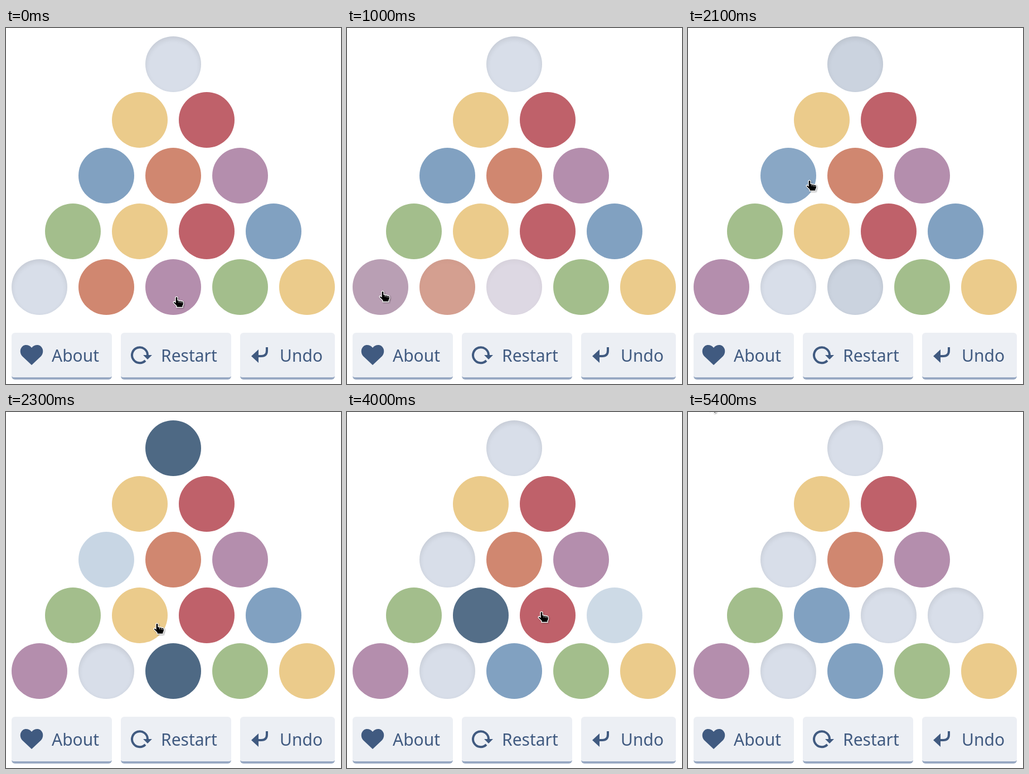
An HTML page for the animation above (5.5 s loop, 601x639 px).

```html
<!DOCTYPE html>
<html lang="en">
<head>
<meta charset="utf-8">
<title>Peg puzzle</title>
<style>
  html, body { margin: 0; width: 100%; height: 100%; overflow: hidden; background: #fff; }
  #stage { position: relative; width: 601px; height: 639px; overflow: hidden; }
  .peg { position: absolute; width: 100px; height: 100px; border-radius: 50%; }
  .button {
    position: absolute; top: 547px; height: 80px;
    background: #eceff4; border-bottom: 4px solid #98a9c3; border-radius: 6px;
  }
  svg { position: absolute; left: 0; top: 0; overflow: visible; }
  text { font: 30px "Noto Sans", "Open Sans", sans-serif; }
  .cursor { stroke: #fff; stroke-width: 1.3; filter: drop-shadow(1px 1px 1px rgba(0, 0, 0, .4)); }
</style>
</head>
<body>
<div id="stage">
  <div class="button" style="left:10px;width:180px"></div>
  <div class="button" style="left:206px;width:198px"></div>
  <div class="button" style="left:420px;width:170px"></div>
  <svg width="601" height="639" fill="#405a80">
    <path d="M46 605L29 589C24 583 25 575 30 571C35 567.500 42 569 46 574C50 569 57 567.500 62 571C67 575 68 583 63 589Z"/>
    <g fill="none" stroke="#405a80" stroke-width="4">
      <path d="M254 588V587A14 14 0 1 0 250 597"/>
      <path d="M450 589H458Q468 589 468 579V573"/>
    </g>
    <path d="M246 587H262L254 595ZM440 589L453 577V601Z"/>
    <text x="82" y="599">About</text>
    <text x="278" y="599">Restart</text>
    <text x="491" y="599">Undo</text>
  </svg>
  <svg id="hand" class="cursor" width="22" height="23">
    <path d="M5 2.500Q7 .3 9 2.500V7.500L18 9.500Q19.500 10 19.500 12V15L18 18V20.500H7V18L1.500 12.500Q.5 10 3 10L5 11.500Z"/>
    <path d="M11.500 9V12M14.500 10V12.500M17 11V13" stroke-width=".8"/>
  </svg>
  <svg id="arrow" class="cursor" width="18" height="27">
    <path d="M1 1V21L5.500 17L9 25L12.500 23.500L9.300 15.700H15.500Z"/>
  </svg>
</div>
<script>
const LOOP = 5500, STEP = 100, FADE = 300;
const stage = document.getElementById('stage');
const hand = document.getElementById('hand');
const arrow = document.getElementById('arrow');

const COLORS = {
  empty: [216, 222, 233],
  red: [191, 97, 106],
  orange: [208, 135, 112],
  yellow: [235, 203, 139],
  green: [163, 190, 140],
  blue: [129, 161, 193],
  purple: [180, 142, 173]
};

const START = `empty
  yellow red
  blue orange purple
  green yellow red blue
  empty orange purple green yellow`.split(/\s+/);

const MOVES = [
  { from: 12, to: 10, pick: 265, drop: 880 },
  { from: 3, to: 12, pick: 2070, drop: 2890 },
  { from: 9, to: 7, pick: 3800, drop: 4390 }
];

// Pointer legs: begin, end, and the spot reached
const LEGS = [
  [0, 0, 306, 482], [400, 800, 64, 472], [1200, 1400, 73, 477], [1400, 1500, 131, 418],
  [1500, 1900, 218, 273], [2100, 2300, 271, 379], [2300, 2400, 296, 433], [2600, 2700, 303, 449],
  [3100, 3400, 470, 355], [3400, 3600, 499, 358], [3800, 4300, 244, 358],
  [4600, 4900, 173, 198], [4900, 5400, 39, -22]
];

const mix = (a, b, p) => a + (b - a) * p;
const clamp = x => Math.min(1, Math.max(0, x));
const darken = rgb => rgb.map(c => c * .85 - 36);

// The CSS "ease" curve, solved by bisection
function ease(x) {
  if (x >= 1) return 1;
  const bezier = (a, b, s) => 3 * a * s * (1 - s) ** 2 + 3 * b * s * s * (1 - s) + s ** 3;
  let lo = 0, hi = 1;
  for (let i = 0; i < 20; i++) {
    const mid = (lo + hi) / 2;
    if (bezier(.25, .25, mid) < x) lo = mid; else hi = mid;
  }
  return bezier(.1, 1, lo);
}

const pegs = START.map((name, i) => {
  const row = Math.floor((Math.sqrt(8 * i + 1) - 1) / 2);
  const x = 300 + (i - row * (row + 1) / 2 - row / 2) * 120;
  const y = 65 + row * 100;
  const el = document.createElement('div');
  el.className = 'peg';
  el.style.left = x - 50 + 'px';
  el.style.top = y - 50 + 'px';
  stage.insertBefore(el, hand);
  return { x, y, el, name, start: name, changes: [] };
});

// The neighbour of a that lies halfway to b, if there is one
const between = (a, b) => pegs.find(p =>
  p !== a && 2 * p.x === a.x + b.x && 2 * p.y === a.y + b.y &&
  Math.hypot(p.x - a.x, p.y - a.y) < 125);

// dip is a momentary loss of opacity
function change(peg, time, name, { rgb = COLORS[name], opacity = 1, dip = 0 } = {}) {
  peg.changes.push({ time, name, rgb, opacity, dip, shade: name === 'empty' ? .09 : 0 });
}

function play({ from, to, pick, drop }) {
  const source = pegs[from], goal = pegs[to], color = source.name;
  const hints = pegs.filter(p => p.name === 'empty' && (between(source, p)?.name ?? 'empty') !== 'empty');
  const taken = between(source, goal);
  change(source, pick, color, { opacity: .5, dip: .2 });
  hints.forEach(p => change(p, pick, 'hint', { rgb: darken(COLORS[color]) }));
  hints.filter(p => p !== goal).forEach(p => change(p, drop, 'empty'));
  change(goal, drop, color, { dip: .3 });
  change(source, drop, 'empty', { dip: .2 });
  change(taken, drop + 70, 'empty', { dip: .2 });
  goal.name = color;
  source.name = taken.name = 'empty';
}

pegs.forEach(peg => change(peg, -FADE, peg.start));
MOVES.forEach(play);

function drawPeg(peg, t) {
  let rgb = COLORS.empty, opacity = 1, shade = 0;
  for (const next of peg.changes.filter(c => c.time <= t)) {
    const x = clamp((t - next.time) / FADE), p = ease(x);
    rgb = rgb.map((c, i) => mix(c, next.rgb[i], p));
    opacity = mix(opacity, next.opacity, p) - next.dip * Math.sin(Math.PI * x) ** 2;
    shade = mix(shade, next.shade, p);
    peg.live = next.name !== 'empty';
  }
  const style = peg.el.style;
  style.backgroundColor = `rgb(${rgb.map(Math.round)})`;
  style.opacity = opacity;
  style.boxShadow = `inset 0 4px 10px rgba(0,0,0,${shade})`;
}

function place(el, shown, x, y) {
  el.style.display = shown ? '' : 'none';
  el.style.transform = `translate(${Math.round(x)}px,${Math.round(y)}px)`;
}

function drawCursor(t) {
  let x = 0, y = 0;
  for (const [begin, end, endX, endY] of LEGS) {
    const p = Math.sin(clamp((t - begin) / (end - begin || 1) + (end === 0)) * Math.PI / 2);
    x = mix(x, endX, p);
    y = mix(y, endY, p);
  }
  const over = pegs.some(peg => peg.live && Math.hypot(peg.x - x, peg.y - y) < 50);
  place(hand, over, x - 7, y - 1);
  place(arrow, !over, x - 1, y - 1);
}

function render(t) {
  pegs.forEach(peg => drawPeg(peg, t));
  drawCursor(t);
}

const begin = performance.now();
function tick() {
  const t = (performance.now() - begin) % LOOP;
  render(Math.floor(t / STEP) * STEP);
  requestAnimationFrame(tick);
}
tick();
</script>
</body>
</html>
```
